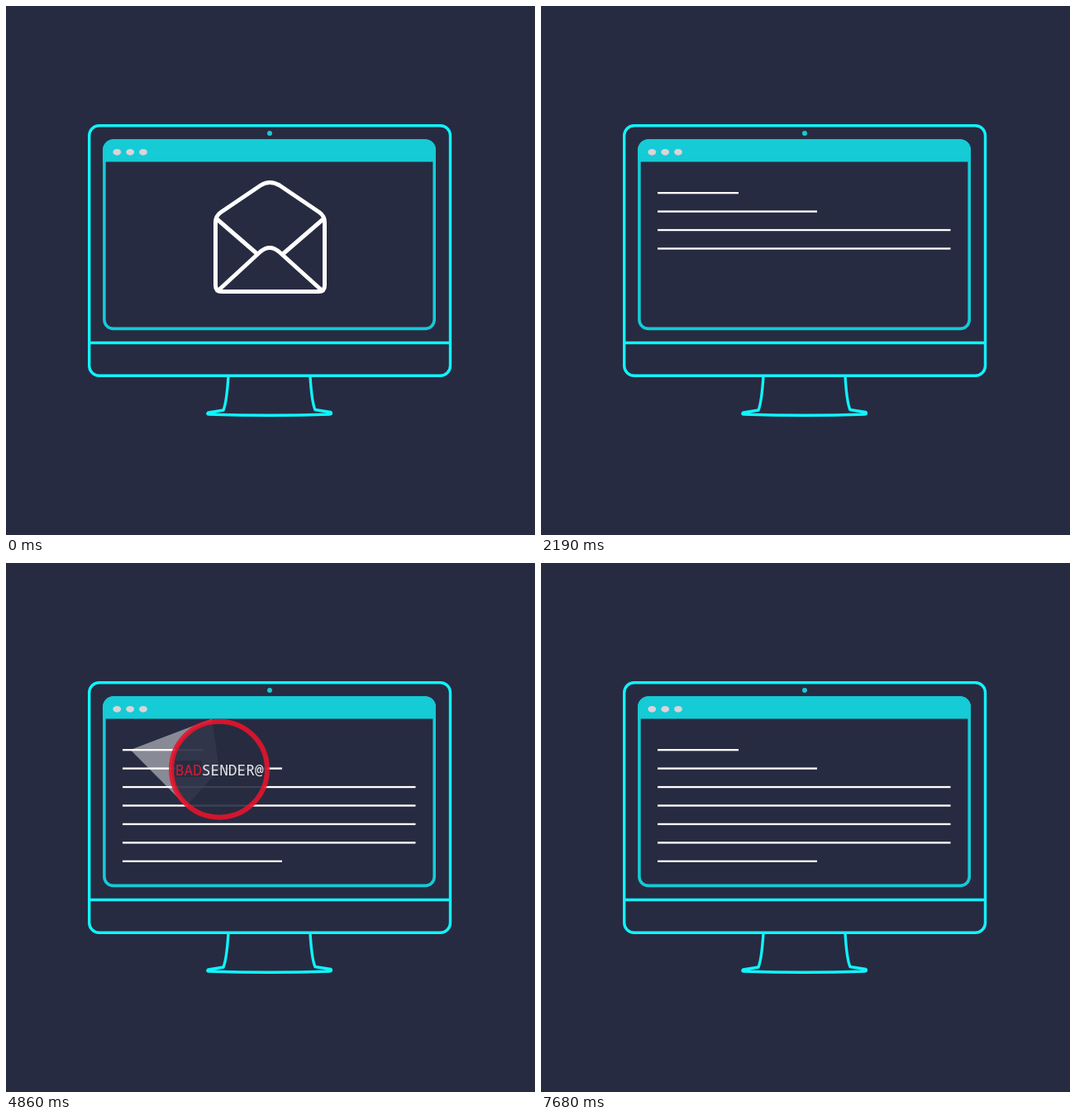
Recreate the animation shown at these times as an HTML page with a canvas. Size 640 by 640 pixels, loop 8 s.

```html
<!DOCTYPE html>
<html lang="en">
<head>
<meta charset="utf-8">
<title>Inspecting a suspicious email</title>
<style>
html, body { margin: 0; width: 100%; height: 100%; overflow: hidden; background: #272b41; }
canvas { display: block; width: 100vw; height: 100vh; }
</style>
</head>
<body>
<canvas id="stage" width="640" height="640"></canvas>
<script>
const ctx = document.getElementById('stage').getContext('2d');
const LOOP = 8000, TICK = 30;
const BG = '#272b41', CYAN = '#10f4fc', TEAL = '#15cbd6', RED = '#e8142c', WHITE = '#fff';

const progress = (t, start, length) => Math.min(1, Math.max(0, (t - start) / length));
const easeOut = p => 1 - (1 - p) * (1 - p);
const mix = (a, b, p) => a + (b - a) * p;

function stroke(path, color, width, join = 'round') {
  ctx.strokeStyle = color;
  ctx.lineWidth = width;
  ctx.lineJoin = join;
  ctx.lineCap = join === 'round' ? 'round' : 'butt';
  ctx.stroke(path);
}

function fill(path, color) {
  ctx.fillStyle = color;
  ctx.fill(path);
}

function ellipse(x, y, rx, ry = rx) {
  const path = new Path2D();
  path.ellipse(x, y, rx, ry, 0, 0, Math.PI * 2);
  return path;
}

function roundRect(x, y, w, h, r) {
  const path = new Path2D();
  path.roundRect(x, y, w, h, r);
  return path;
}

function layer(alpha, draw) {
  if (alpha <= 0) return;
  ctx.save();
  ctx.globalAlpha = alpha;
  draw();
  ctx.restore();
}

const stand = new Path2D('M269 448Q267 479 263 489L244.5 492Q242.5 493.8 246 494Q319 496.5 391 494Q395 493.5 393 491.5L374 488.5Q370 480 368 448');

function drawMonitor() {
  stroke(stand, CYAN, 3.4);
  stroke(roundRect(100.7, 144.7, 436.8, 302.6, 12), CYAN, 3.4);
  stroke(new Path2D('M101 407.5H537'), CYAN, 3.4);
  fill(ellipse(319, 154, 3), TEAL);
  stroke(roundRect(118.9, 163, 399.3, 227.4, 11), TEAL, 3.6);
  fill(roundRect(117.1, 161.2, 402.9, 27.4, [13, 13, 0, 0]), TEAL);
  for (const x of [134.3, 150.2, 166]) fill(ellipse(x, 176.8, 4.9, 3.9), '#dbd3d8');
}

const body = new Path2D('M253.5 262Q253.5 254 260 249.5L308 217Q319 210 331 217L379 249.5Q385.5 254 385.5 262V338Q385.5 345.5 378 345.5H261Q253.5 345.5 253.5 338Z');
const folds = new Path2D('M256 258.5L304 300M383 258.5L335 300M257 344L308 297Q319 288 330 297L382 344');
const pocketMouth = new Path2D('M256 200V258L304 300L308 297Q319 288 330 297L335 300L383 258V200Z');
const sheet = new Path2D('M269.5 340V224.5H369.5V340');
const atSign = new Path2D('M335 277A24 24 0 1 1 343.5 258.5Q343.5 270 335 270Q326.5 270 328 261L330.5 248');

function drawEnvelope(t) {
  const out = progress(t, 1530, 270);
  layer(1 - out, () => {
    ctx.translate(-140 * out * out, 0);
    stroke(body, WHITE, 5);
    const rise = easeOut(progress(t, 270, 300));
    if (rise > 0) {
      ctx.save();
      ctx.clip(pocketMouth);
      ctx.translate(0, 78 * (1 - rise));
      fill(sheet, BG);
      stroke(sheet, WHITE, 5, 'miter');
      stroke(atSign, WHITE, 5);
      const bowl = new Path2D();
      bowl.ellipse(318, 259, 8.6, 11.2, 0.28, 0, Math.PI * 2);
      stroke(bowl, WHITE, 5);
      ctx.restore();
    }
    stroke(folds, WHITE, 5);
  });
}

const HAND = [[7, 16], [7, 4], [9.5, 1.5], [12, 4], [12, 9], [18, 11],
  [20.5, 14], [20.5, 20], [17, 28.5], [9, 28.5], [2, 19], [3.5, 15.5]];
const SLIVER = [[1.5, 12], [1.5, 4], [2.5, 1.5], [5, 1.5], [6, 2], [7.5, 4.5],
  [8, 8], [8, 17], [6, 22.5], [3, 22.5], [1.5, 20], [1.5, 16]];

function drawCursor(t) {
  if (t < 750) return;
  const p = progress(t, 750, 240), move = easeOut(p);
  layer(1 - progress(t, 1260, 150), () => {
    ctx.translate(mix(510, 323, move), mix(327, 257, move));
    const outline = new Path2D();
    HAND.forEach(([x, y], i) => {
      const [sx, sy] = SLIVER[i];
      outline.lineTo(mix(sx, x, p), mix(sy, y, p));
    });
    outline.closePath();
    fill(outline, '#f2f2f2');
    stroke(outline, '#000', 2.6);
  });
}

// Each text line: right end, wipe start, wipe length.
const LINES = [[239, 1740, 90], [334, 1860, 90], [495.5, 1980, 90], [495.5, 2100, 90],
  [495.5, 2220, 90], [495.5, 2340, 150], [334, 2550, 150]];

function drawLines(t) {
  ctx.fillStyle = WHITE;
  LINES.forEach(([right, start, length], i) => {
    ctx.fillRect(141, 225 + 22.45 * i, (right - 141) * progress(t, start, length), 2.3);
  });
}

function drawText(text, center, baseline, size) {
  ctx.font = `500 ${size}px "Noto Sans Mono", monospace`;
  ctx.textAlign = 'left';
  const left = center - ctx.measureText(text).width / 2;
  ctx.fillStyle = WHITE;
  ctx.fillText(text, left, baseline);
  return left;
}

function drawMarked(text, from, to, center, baseline, size, red) {
  const left = drawText(text, center, baseline, size);
  if (red <= 0) return;
  const start = left + ctx.measureText(text.slice(0, from)).width;
  const channel = (a, b) => Math.round(mix(a, b, red));
  ctx.fillStyle = BG;
  ctx.fillRect(start, baseline - size, ctx.measureText(text.slice(from, to)).width, size + 2);
  ctx.fillStyle = `rgb(${channel(255, 232)}, ${channel(255, 20)}, ${channel(255, 44)})`;
  ctx.fillText(text.slice(from, to), start, baseline);
}

function drawLens(x, y, beam) {
  fill(new Path2D(beam), 'rgba(255,255,255,.5)');
  const rim = ellipse(x, y, 58);
  fill(rim, BG);
  stroke(rim, RED, 6);
}

const visibility = (t, inAt, outAt, length) =>
  progress(t, inAt, length) * (1 - progress(t, outAt, length));

function drawLenses(t) {
  layer(visibility(t, 3420, 4830, 270), () => {
    drawLens(258, 249.7, 'M150.5 226L249 188.5L258 250L218 294Z');
    drawMarked('BADSENDER@', 0, 3, 258.2, 256.8, 17.8, progress(t, 4170, 180));
  });
  layer(visibility(t, 5760, 7500, 180), () => {
    drawLens(328.5, 325.6, 'M211 293.5L312 267L328 326L283 365Z');
    drawText('HELLO', 328, 311.6, 20);
    drawMarked('MY NMAE', 4, 6, 327.6, 337.6, 20, progress(t, 6540, 150));
    drawText('IS', 328, 363.2, 20);
  });
}

function render(now) {
  const t = Math.floor((now % LOOP) / TICK) * TICK;
  ctx.fillStyle = BG;
  ctx.fillRect(0, 0, 640, 640);
  drawMonitor();
  drawEnvelope(t);
  drawLines(t);
  drawCursor(t);
  drawLenses(t);
}

let origin;
function tick(now) {
  origin ??= now;
  render(now - origin);
  requestAnimationFrame(tick);
}
render(0);
requestAnimationFrame(tick);
</script>
</body>
</html>
```
